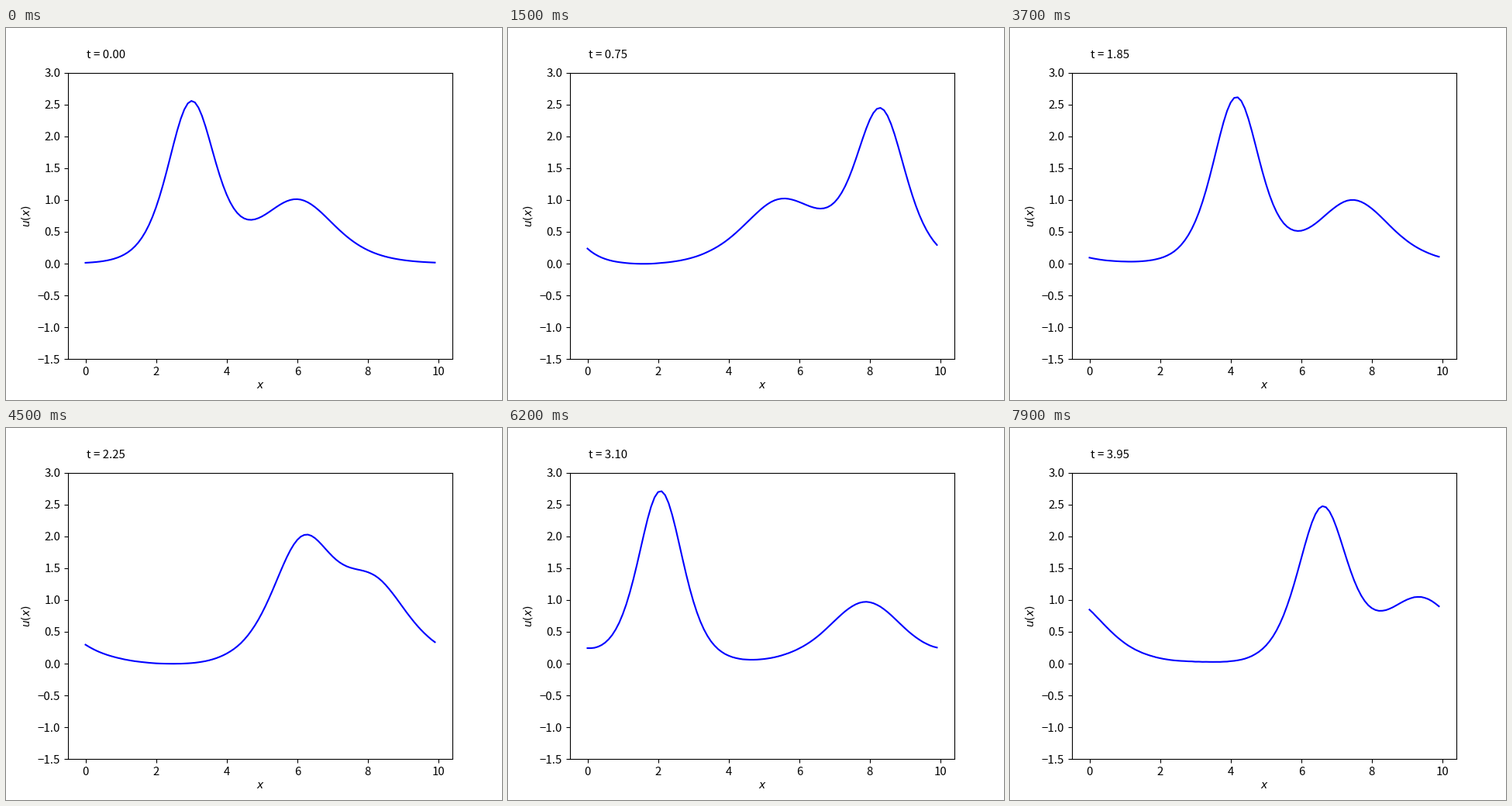
Write a matplotlib script that moves like this. It is 640 px wide and 480 px high and loops after 8000 ms.

```python
import numpy as np
import matplotlib.pyplot as plt
from matplotlib.animation import FuncAnimation

W, H, DPI = 640, 480, 100
LENGTH, N = 10.0, 100
FRAMES, DT_FRAME, SUBSTEPS = 80, 0.05, 50

plt.rcParams["font.family"] = "Noto Sans CJK JP"
plt.rcParams["font.size"] = 10.8

x = np.arange(N) * LENGTH / N
k = 2 * np.pi / LENGTH * np.arange(N // 2 + 1)
k[-1] = 0


def soliton(speed, center):
    return speed / 2 / np.cosh(np.sqrt(speed) / 2 * (x - center)) ** 2


def solve_kdv(u):
    """Solve u_t + 6 u u_x + u_xxx = 0 with integrating-factor RK4."""
    h = DT_FRAME / SUBSTEPS
    half = np.exp(0.5j * h * k**3)
    full = half**2

    def rhs(v):
        return -3j * k * np.fft.rfft(np.fft.irfft(v, N) ** 2)

    v = np.fft.rfft(u)
    states = [u]
    for _ in range(FRAMES - 1):
        for _ in range(SUBSTEPS):
            a = rhs(v)
            b = rhs(half * (v + h / 2 * a))
            c = rhs(half * v + h / 2 * b)
            d = rhs(full * v + h * half * c)
            v = full * v + h / 6 * (full * a + 2 * half * (b + c) + d)
        states.append(np.fft.irfft(v, N))
    return states


waves = solve_kdv(soliton(5, 3) + soliton(2, 6))

fig, ax = plt.subplots(figsize=(W / DPI, H / DPI), dpi=DPI)
line, = ax.plot(x, waves[0], color="blue", lw=1.5)
ax.set_ylim(-1.5, 3.0)


def label(px, py, text, **style):
    return fig.text(px / W, 1 - py / H, text, va="baseline", **style)


label(328, 465, "$x$", ha="center", size=10, math_fontfamily="dejavusans")
label(30.5, 242.5, "$u(x)$", ha="center", size=10, rotation=90,
      rotation_mode="anchor", math_fontfamily="dejavusans")
clock = label(104.5, 39, "t = 0.00", ha="left")


def update(i):
    line.set_ydata(waves[i])
    clock.set_text(f"t = {i * DT_FRAME:.2f}")
    return line, clock


anim = FuncAnimation(fig, update, frames=FRAMES, interval=100,
                     repeat=True, repeat_delay=0)
plt.show()
```
